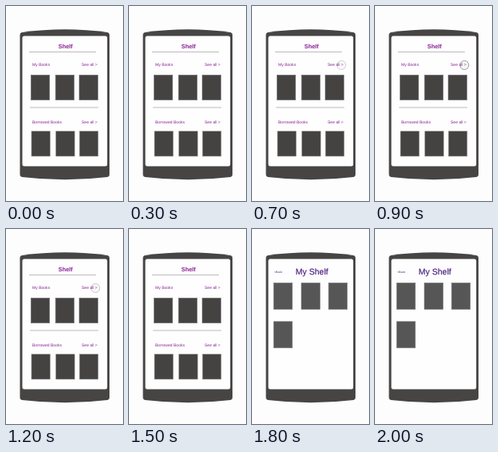
These frames come from a looping animation (147 by 244 pixels, 2.1 s). An HTML page:

```html
<!DOCTYPE html>
<html lang="en">
<head>
<meta charset="utf-8">
<title>Shelf</title>
<style>
  html, body { margin: 0; height: 100%; overflow: hidden; background: #fdfdfd; }
  svg { display: block; width: 100vw; height: 100vh; }
  text { font: 5.05px "Liberation Sans", Arial, sans-serif; text-rendering: geometricPrecision; }
  #shelf text { fill: #8b2297; }
  #shelf .title { font-size: 7.4px; font-weight: bold; }
  #all text { fill: #4c2380; }
  #all .title { font-size: 10.5px; stroke: #4c2380; stroke-width: .2px; }
  #all .back { font-size: 3.6px; }
  .rule { stroke: #aaa; stroke-width: .8; }
</style>
</head>
<body>
<svg viewBox="0 0 147 244">
  <path fill="#474444" d="M17.5 36Q17.5 33.5 20 33Q74 25.5 127.500 33Q130 33.500 130 36V211Q130 213.500 127.500 214Q74 220.500 20 214Q17.500 213.500 17.500 211Z"/>
  <rect x="20.5" y="37.5" width="106.700" height="163" rx="2.500" fill="#fefefe"/>
  <g id="shelf">
    <text class="title" x="74.800" y="53.300" text-anchor="middle">Shelf</text>
    <path class="rule" d="M29 57.500H113M30 127H116"/>
    <text x="33" y="75">My Books</text>
    <text x="95" y="75">See all &gt;</text>
    <text x="33" y="146.700">Borrowed Books</text>
    <text x="95" y="146.700">See all &gt;</text>
    <g class="books"></g>
    <circle id="tap" cx="112.300" cy="74" r="5.500" fill="#999" fill-opacity=".08" stroke="#777" stroke-width=".7"/>
  </g>
  <g id="all">
    <text class="back" x="28" y="55.300">&lt;Back</text>
    <text class="title" x="75.300" y="57.300" text-anchor="middle">My Shelf</text>
    <g class="books"></g>
  </g>
</svg>
<script>
  const LOOP = 2100, SWITCH = 1600;
  const get = id => document.getElementById(id);
  const shelf = get('shelf'), all = get('all'), tap = get('tap');
  const clamp = v => Math.max(0, Math.min(1, v));

  function addBooks(screen, xs, y, height, fill, edge) {
    const row = xs.map(x =>
      `<rect x="${x}" y="${y}" width="23.5" height="${height}" fill="${fill}" stroke="${edge}" stroke-width=".6"/>`);
    screen.querySelector('.books').innerHTML += row.join('');
  }
  addBooks(shelf, [31.3, 62.2, 92], 86.300, 31.400, '#454242', '#777');
  addBooks(shelf, [32, 62.7, 92.300], 156.700, 31.300, '#454242', '#999');
  addBooks(all, [27.200, 62, 96.200], 67.500, 33, '#565656', '#777');
  addBooks(all, [27.200], 115.800, 33, '#565656', '#777');

  function draw(now) {
    const t = Math.floor(now % LOOP / 100) * 100;
    const opened = t >= SWITCH;
    shelf.style.display = opened ? 'none' : '';
    all.style.display = opened ? '' : 'none';
    tap.style.opacity = clamp((t - 500) / 400) * clamp((1500 - t) / 500);
    requestAnimationFrame(draw);
  }
  draw(0);
</script>
</body>
</html>
```
